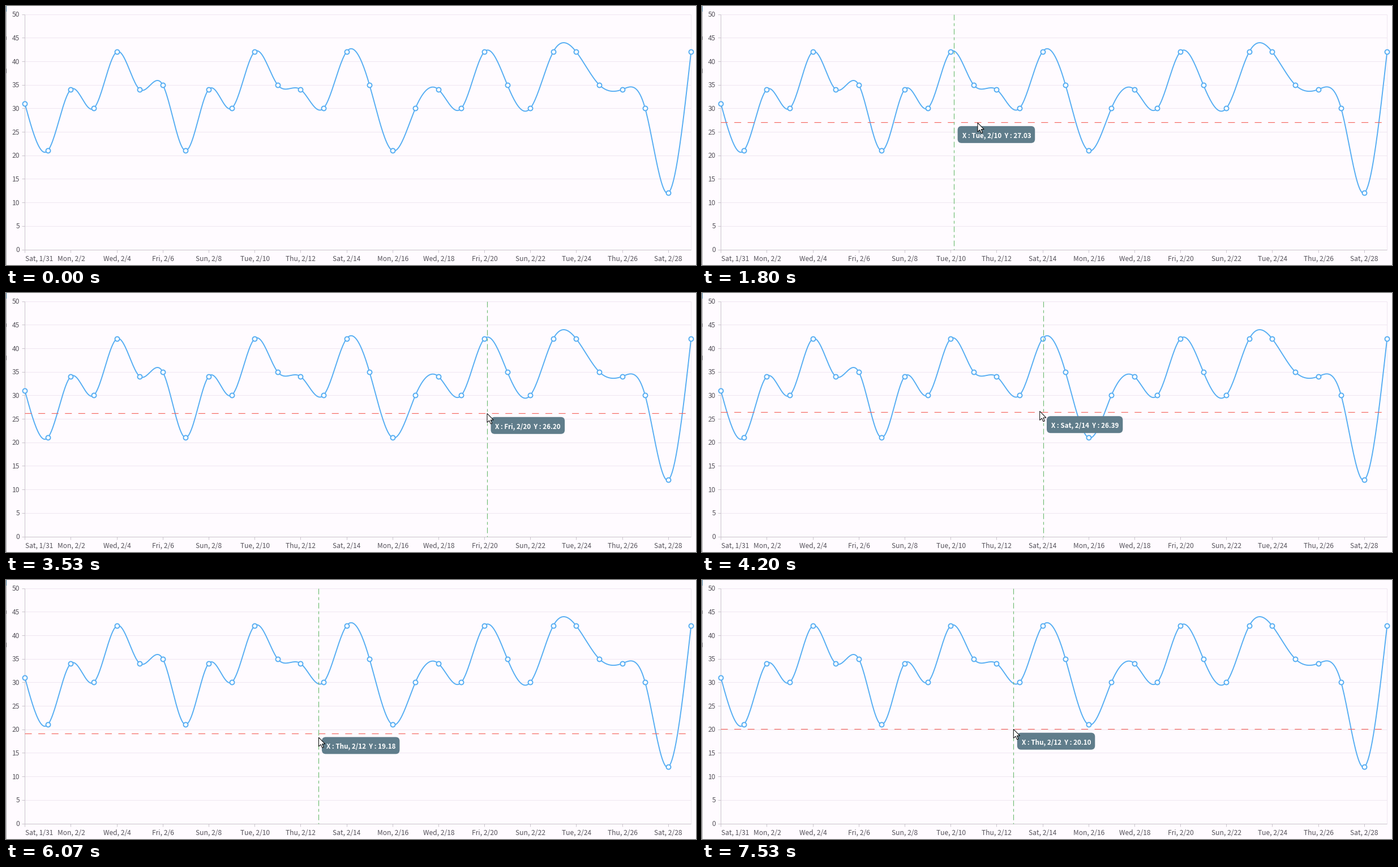
A matplotlib script for the animation above (8.54 s loop, 1219x459 px).

```python
import math

import matplotlib.pyplot as plt
import numpy as np
from matplotlib.animation import FuncAnimation
from matplotlib.collections import LineCollection
from matplotlib.patches import FancyBboxPatch, Polygon, Rectangle

WIDTH, HEIGHT, DPI = 1219, 459, 64
PT = 72 / DPI  # points per pixel
INTERVAL, FRAMES = 35, 244
STEP, START = 200 / 3, 330  # pointer sampling period and first event, ms

LEFT, RIGHT, TOP, BOTTOM = 33.3, 1210.3, 14.5, 431.5
BACKGROUND, GRID, AXIS, LABEL = "#fffbff", "#efe6f1", "#c9c4cb", "#55525a"
BLUE, RED, GREEN, SLATE = "#55adf3", "#f4645c", "#6cbb70", "#607d8b"

VALUES = [31, 21, 34, 30, 42, 34, 35, 21, 34, 30, 42, 35, 34, 30, 42,
          35, 21, 30, 34, 30, 42, 35, 30, 42, 42, 35, 34, 30, 12, 42]
DAY_WIDTH = (RIGHT - LEFT) / (len(VALUES) - 1)
WEEKDAYS = ["Sat", "Sun", "Mon", "Tue", "Wed", "Thu", "Fri"]

# Pointer path: step, x, y value, and their rates per step
PATH = [
    (0, -8, 26.2, 18, 0),
    (12, 155.5, 27.87, 6, -0.12),
    (34, 807.5, 26.76, 4, 0),
    (44, 850, 26.2, 0, 0),
    (48, 850, 26.2, 0, 0),
    (58, 602.5, 26.39, -6, 0),
    (72, 558.5, 46.63, 0, 0),
    (86, 551.5, 19.18, 1, -0.84),
    (99, 554, 12.5, 0, 0),
    (101, 554, 12.5, 0, 0),
    (108, 550.3, 20.10, 0, 0),
]

plt.rcParams["font.family"] = ["Noto Sans CJK JP", "DejaVu Sans"]


def x_px(day):
    return LEFT + DAY_WIDTH * np.asarray(day)


def y_px(value):
    return BOTTOM - (BOTTOM - TOP) / 50 * np.asarray(value)


def date_label(day):
    day = min(max(day, 0), len(VALUES) - 1)
    if day == 0:
        date = "1/31"
    elif day <= 28:
        date = f"2/{day}"
    else:
        date = f"3/{day - 28}"
    return f"{WEEKDAYS[day % 7]}, {date}"


def natural_spline(values, samples=24):
    y = np.array(values, float)
    n = len(y)
    system = np.eye(n)
    rhs = np.zeros(n)
    for i in range(1, n - 1):
        system[i, i - 1:i + 2] = 1, 4, 1
        rhs[i] = 6 * (y[i - 1] - 2 * y[i] + y[i + 1])
    bend = np.linalg.solve(system, rhs)
    days = np.linspace(0, n - 1, (n - 1) * samples + 1)
    i = np.minimum(days.astype(int), n - 2)
    b = days - i
    a = 1 - b
    curve = (a * y[i] + b * y[i + 1]
             + ((a**3 - a) * bend[i] + (b**3 - b) * bend[i + 1]) / 6)
    return days, curve


def hermite(p, q, v, w, u, span):
    return ((2 * u**3 - 3 * u**2 + 1) * p + (3 * u**2 - 2 * u**3) * q
            + span * ((u**3 - 2 * u**2 + u) * v + (u**3 - u**2) * w))


def pointer(step):
    step = min(max(step, 0), PATH[-1][0])
    for (k0, x0, y0, vx0, vy0), (k1, x1, y1, vx1, vy1) in zip(PATH, PATH[1:]):
        if step <= k1:
            u, span = (step - k0) / (k1 - k0), k1 - k0
            return (hermite(x0, x1, vx0, vx1, u, span),
                    hermite(y0, y1, vy0, vy1, u, span))


fig = plt.figure(figsize=(WIDTH / DPI, HEIGHT / DPI), dpi=DPI,
                 facecolor=BACKGROUND)
ax = fig.add_axes([0, 0, 1, 1])
ax.set(xlim=(0, WIDTH), ylim=(HEIGHT, 0))
ax.axis("off")


def segments(lines, color):
    ax.add_collection(LineCollection(lines, colors=color, linewidths=PT))


def label(x, y, text, size, **style):
    return ax.text(x, y, text, fontsize=size * PT, va="baseline", **style)


def draw_chart():
    levels = range(0, 51, 5)
    ticks = range(0, len(VALUES), 2)
    segments([[(LEFT, y_px(v)), (RIGHT, y_px(v))] for v in levels]
             + [[(RIGHT, TOP), (RIGHT, BOTTOM)]], GRID)
    segments([[(LEFT, TOP), (LEFT, BOTTOM)], [(LEFT, BOTTOM), (RIGHT, BOTTOM)]]
             + [[(28, y_px(v)), (LEFT, y_px(v))] for v in levels]
             + [[(x_px(d), BOTTOM), (x_px(d), 436.5)] for d in ticks], AXIS)
    for v in levels:
        label(24.3, y_px(v) + 4.7, str(v), 12, ha="right", color=LABEL)
    for d in ticks:
        if d == 0:
            label(33.5, 451.5, date_label(d), 12, ha="left", color=LABEL)
        else:
            label(x_px(d) + 0.5, 451.5, date_label(d), 12, ha="center",
                  color=LABEL)

    # Sliver of the neighbouring window
    ax.add_patch(Rectangle((0, 0), 1, HEIGHT, color="#aaa6ac", lw=0))
    for y, h, color in [(0, 10, "#3f7396"), (54, 6, "#5c5960"),
                        (111, 8, "#5c5960")]:
        ax.add_patch(Rectangle((0, y), 1, h, color=color, lw=0))

    days, curve = natural_spline(VALUES)
    ax.plot(x_px(days), y_px(curve), color=BLUE, lw=1.9 * PT, zorder=3)
    ax.plot(x_px(range(len(VALUES))), y_px(VALUES), "o", ms=8 * PT, mfc="white",
            mec=BLUE, mew=1.9 * PT, zorder=4)


draw_chart()

horizontal, = ax.plot([], [], color=RED, lw=1.15 * PT, zorder=5,
                      dashes=(10.5, 10), dash_capstyle="butt")
vertical, = ax.plot([], [], color=GREEN, lw=1.15 * PT, zorder=5,
                    dashes=(8.7, 4.35, 4.35, 4.35), dash_capstyle="butt")
tooltip = FancyBboxPatch((0, 0), 130, 30, fc=SLATE, lw=0, zorder=6,
                         boxstyle="round,pad=0,rounding_size=7")
ax.add_patch(tooltip)
tip_text = label(0, 0, "", 11.6, color="white", weight="bold", zorder=7)
ARROW = np.array([(0, 0), (0, 16), (3.7, 12.6), (6.3, 18.4), (8.7, 17.3),
                  (6.2, 11.6), (11.2, 11.6)])
cursor = Polygon(ARROW, fc="white", ec="black", lw=PT, zorder=8)
ax.add_patch(cursor)
crosshair = [horizontal, vertical, tooltip, tip_text]


def update(frame):
    now = (frame + 0.5) * INTERVAL
    step = math.floor((now - START) / STEP + 0.1)
    x, value = pointer(step)
    next_x, next_value = pointer(step + 1)

    # The system cursor runs one sample ahead of the crosshair
    cursor.set_visible(step >= 0)
    cursor.set_xy(ARROW + (next_x, float(y_px(next_value)) + 0.5))

    inside = step >= 0 and x >= LEFT
    for artist in crosshair:
        artist.set_visible(inside)
    if inside:
        y = float(y_px(value))
        day = int((x - LEFT) / DAY_WIDTH)
        horizontal.set_data([LEFT, RIGHT], [y, y])
        vertical.set_data([x, x], [TOP, BOTTOM])
        tip_text.set_text(f"X : {date_label(day)}  Y : {value:.2f}")
        tip_text.set_position((x + 14.5, y + 27))
        extent = tip_text.get_window_extent()
        extent = extent.transformed(ax.transData.inverted())
        tooltip.set_bounds(x + 6.5, y + 6.8, abs(extent.width) + 15, 30)
    return [*crosshair, cursor]


animation = FuncAnimation(fig, update, frames=FRAMES, interval=INTERVAL,
                          repeat=True, repeat_delay=0, blit=False)
plt.show()
```
